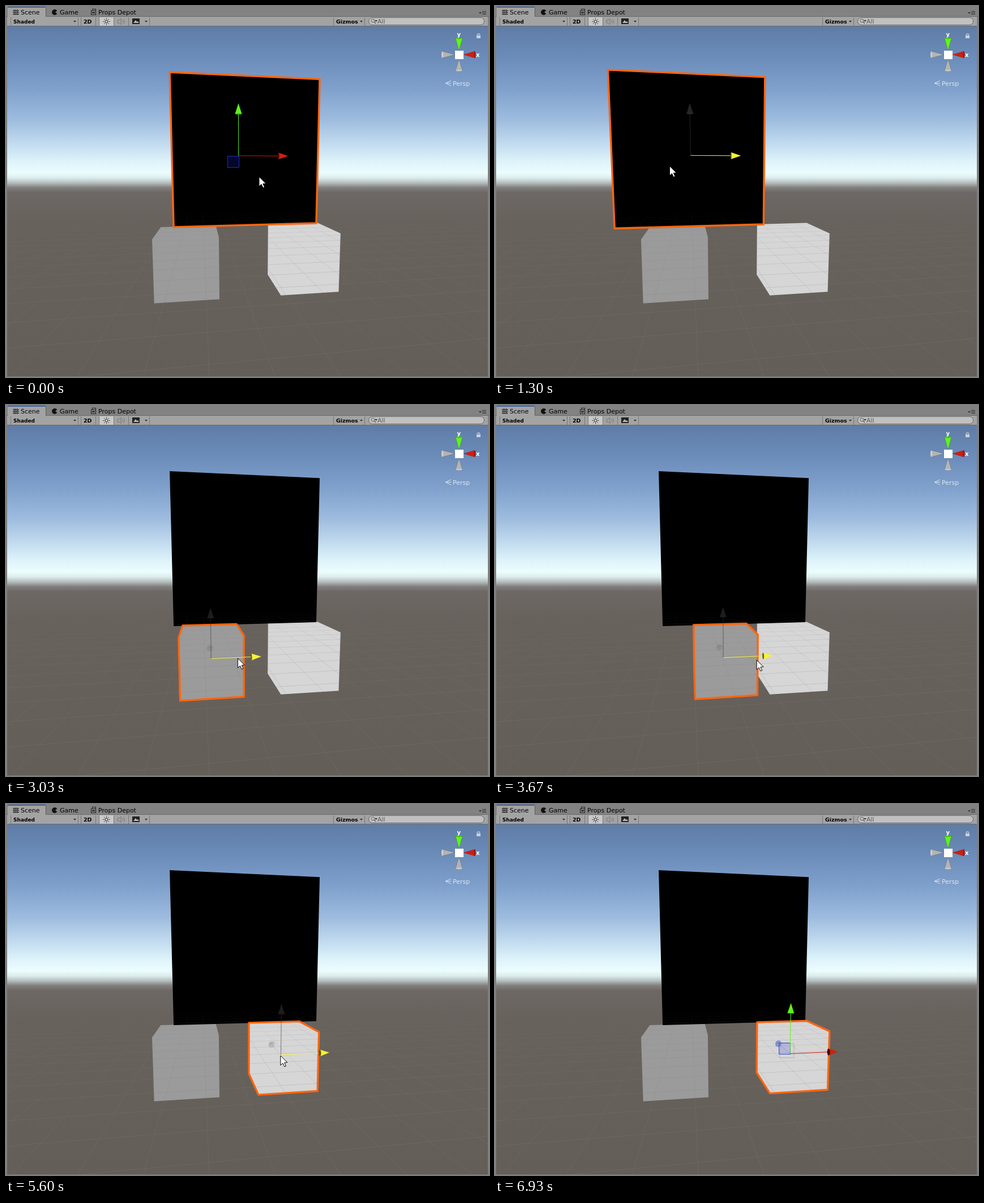
These frames come from a looping animation (853x656 px, 7460 ms). An HTML page with a canvas:

```html
<!DOCTYPE html>
<html lang="en">
<head>
<meta charset="utf-8">
<title>Scene view</title>
<style>
html, body { margin: 0; width: 100%; height: 100%; overflow: hidden; background: #828282; }
canvas { display: block; }
</style>
</head>
<body>
<canvas id="stage" width="853" height="656"></canvas>
<script>
const stage = document.getElementById('stage');
const W = 853, H = 656, LOOP = 7460, FOCAL = 537, CX = 426.5, CY = 346;
const FONT = '"DejaVu Sans", sans-serif';

// World axes expressed in camera space.
const X = [0.9888, 0.0155, 0.1484];
const Y = [0, 0.9946, -0.1037];
const Z = [-0.1492, 0.1026, 0.9835];

const add = (p, axis, k) => p.map((v, i) => v + axis[i] * k);
const dot = (a, b) => a.reduce((sum, v, i) => sum + v * b[i], 0);
const project = p => [CX + FOCAL * p[0] / p[2], CY - FOCAL * p[1] / p[2]];

// Each track lists [ms, offset along X]; past its end the move is undone.
const wall = {
  center: [-0.178, 0.919, 6.07], size: 2.38, color: '#000', grab: 35, drag: [70, 1740],
  track: [[70, 0], [380, 3.1], [800, -2.4], [1125, 3.1], [1405, -2.4], [1690, 3.1], [1860, 3.1]]
};
const grayBox = {
  center: [-1.0131, -1.0064, 5.183], size: 1, color: '#9b9b9b', grab: 72, drag: [2430, 4150],
  track: [[2430, 0], [2640, -2.04], [2950, 0.69], [3290, -1.55], [3620, 0.88], [4000, -1.13], [4150, 0]]
};
const whiteBox = {
  center: [0.9645, -0.9754, 5.48], size: 1, color: '#d6d6d6', grab: 60, drag: [4800, 6480],
  track: [[4800, 0], [5090, 2.44], [5310, -1.65], [5485, 1.5], [5685, -1.5], [5930, 2.38],
          [6200, -1.4], [6430, 2.1], [6560, 2.1]]
};
const boxes = [whiteBox, grayBox, wall];

const pointerPath = [
  [0, 447, 302], [70, 446, 268], [1300, 304, 283], [1740, 699, 285], [1970, 359, 417],
  [2130, 350, 440], [2300, 393, 445], [2430, 393, 445], [3670, 465, 451], [4150, 393, 452],
  [4480, 510, 425], [4670, 581, 439], [4800, 581, 439], [5100, 765, 412], [5600, 501, 445],
  [6480, 768, 432], [6740, 160, 160], [6920, 320, 640]
];

function ease(keys, t, col = 1) {
  if (t <= keys[0][0]) return keys[0][col];
  for (let i = 1; i < keys.length; i++) {
    const a = keys[i - 1], b = keys[i];
    if (t < b[0]) {
      const k = (1 - Math.cos(Math.PI * (t - a[0]) / (b[0] - a[0]))) / 2;
      return a[col] + (b[col] - a[col]) * k;
    }
  }
  return keys[keys.length - 1][col];
}

function centerAt(box, t) {
  const end = box.track[box.track.length - 1][0];
  return add(box.center, X, t >= end ? 0 : ease(box.track, t));
}

const isDragged = (box, t) => t >= box.drag[0] && t < box.drag[1];
const selectedAt = t => t < 2130 ? wall : t < 4490 ? grayBox : whiteBox;

function path(c, points, closed = true) {
  c.beginPath();
  points.forEach(p => c.lineTo(p[0], p[1]));
  if (closed) c.closePath();
}

function shape(c, points, fill, stroke, width = 1) {
  path(c, points);
  if (fill) { c.fillStyle = fill; c.fill(); }
  if (stroke) { c.strokeStyle = stroke; c.lineWidth = width; c.stroke(); }
}

function line(c, points, color, width = 1) {
  path(c, points, false);
  c.strokeStyle = color;
  c.lineWidth = width;
  c.stroke();
}

function rect(c, color, x, y, w, h) {
  c.fillStyle = color;
  c.fillRect(x, y, w, h);
}

function label(c, text, x, y, size = 11, color = '#000', weight = '') {
  c.font = `${weight} ${size}px ${FONT}`;
  c.fillStyle = color;
  c.fillText(text, x, y);
}

function hull(points) {
  const sorted = [...points].sort((a, b) => a[0] - b[0] || a[1] - b[1]);
  const half = list => {
    const out = [];
    for (const p of list) {
      while (out.length > 1) {
        const [a, b] = out.slice(-2);
        if ((b[0] - a[0]) * (p[1] - a[1]) - (b[1] - a[1]) * (p[0] - a[0]) > 0) break;
        out.pop();
      }
      out.push(p);
    }
    return out.slice(0, -1);
  };
  return [...half(sorted), ...half(sorted.reverse())];
}

function silhouette(center, size) {
  const corners = [];
  const h = size / 2;
  for (const a of [-h, h]) for (const b of [-h, h]) for (const d of [-h, h])
    corners.push(project(add(add(add(center, X, a), Y, b), Z, d)));
  return hull(corners);
}

function layer(paint) {
  const canvas = document.createElement('canvas');
  canvas.width = W;
  canvas.height = H;
  paint(canvas.getContext('2d'));
  return canvas;
}

const sky = layer(c => {
  const g = c.createLinearGradient(0, 36, 0, 656);
  [[36, '#5f7ca6'], [90, '#6b8cb9'], [150, '#81a2cd'], [200, '#9dbbde'], [245, '#c3dcef'],
   [275, '#def3fa'], [295, '#ecfdfd'], [304, '#dcecec'], [313, '#b2bcbc'], [321, '#827f7e'],
   [330, '#6d6865'], [380, '#68625d'], [656, '#645e58']]
    .forEach(([y, color]) => g.addColorStop((y - 36) / 620, color));
  rect(c, g, 2, 36, 849, 619);
});

const grid = layer(c => {
  const depth = 3.16;
  const ground = (x, z) => project(add(add(add([0, 0, 0], Y, -depth), X, x), Z, z));
  const fade = z => 0.34 * Math.max(0, 1 - z / 23);
  c.beginPath();
  c.rect(2, 36, 849, 619);
  c.clip();
  for (let z = 3.7; z < 23; z++)
    line(c, [ground(-25, z), ground(25, z)], `rgba(128,128,128,${fade(z)})`);
  for (let x = -21.93; x < 23; x++)
    for (let z = 3.7; z < 23; z++)
      line(c, [ground(x, z), ground(x, z + 1)], `rgba(128,128,128,${fade(Math.hypot(x, z))})`);
});

const chevron = (c, x, y) => shape(c, [[x, y], [x + 5, y], [x + 2.5, y + 3]], '#333');

function paintToolbar(c) {
  rect(c, '#828282', 0, 0, W, 36);
  rect(c, '#a3a3a3', 2, 19, 849, 17);
  rect(c, '#696969', 0, 18, W, 1);
  rect(c, '#6a6a6a', 2, 35, 849, 1);
  rect(c, '#a3a3a3', 3, 2, 67, 17);
  rect(c, '#42649d', 3, 1, 67, 2);
  rect(c, '#5c5c5c', 70, 3, 1, 15);

  for (let i = 0; i < 3; i++) {
    rect(c, '#222', 14 + i * 3, 6, 1, 10);
    rect(c, '#222', 12, 8 + i * 3, 11, 1);
  }
  label(c, 'Scene', 26, 15);
  c.fillStyle = '#111';
  c.beginPath();
  c.moveTo(87, 11);
  c.arc(86, 11, 5, 0.55, 5.73);
  c.fill();
  label(c, 'Game', 95, 15);
  c.strokeStyle = '#222';
  c.lineWidth = 1;
  c.strokeRect(150.5, 8.5, 8, 7);
  c.strokeRect(152.5, 5.5, 6, 3);
  rect(c, '#222', 152, 11, 5, 2);
  label(c, 'Props Depot', 163, 15);
  chevron(c, 835, 11);
  for (let i = 0; i < 3; i++) rect(c, '#333', 841, 9 + i * 2.5, 7, 1);

  for (const x of [8, 127, 132, 158, 164, 190, 216, 253, 578, 633]) rect(c, '#777', x, 20, 1, 15);
  rect(c, '#c8c8c8', 165, 20, 25, 15);
  label(c, 'Shaded', 13, 31, 9, '#000', 'bold');
  chevron(c, 119, 26);
  label(c, '2D', 137, 31, 9.5, '#000', 'bold');
  for (let i = 0; i < 8; i++) {
    const a = i * Math.PI / 4, u = Math.cos(a), v = Math.sin(a);
    line(c, [[177.5 + u * 4, 27.5 + v * 4], [177.5 + u * 6, 27.5 + v * 6]], '#222');
  }
  c.beginPath();
  c.arc(177.5, 27.5, 2.4, 0, 7);
  c.stroke();
  shape(c, [[197, 25], [200, 25], [203, 22], [203, 33], [200, 30], [197, 30]], null, '#777');
  for (const r of [3, 6]) {
    c.beginPath();
    c.arc(203.5, 27.5, r, -0.9, 0.9);
    c.stroke();
  }
  rect(c, '#222', 223, 22, 13, 10);
  shape(c, [[225, 30], [229, 25], [231, 28], [233, 27], [235, 30]], '#bbb');
  chevron(c, 245, 26);
  label(c, 'Gizmos', 583, 31, 9.5, '#000', 'bold');
  chevron(c, 625, 26);

  c.beginPath();
  c.roundRect(640.5, 20.5, 204, 13, 6.5);
  c.fillStyle = '#c0c0c0';
  c.fill();
  c.strokeStyle = '#666';
  c.stroke();
  c.beginPath();
  c.arc(648, 26, 3, 0, 7);
  c.stroke();
  line(c, [[650, 28], [653, 31]], '#555', 1.3);
  chevron(c, 651, 25);
  label(c, 'All', 656, 31, 11, '#5c5c5c');
}

function paintCompass(c) {
  const gray = '#b4b4b4';
  const flatCone = (tip, a, b, fill) => shape(c, [tip, a, b], fill, 'rgba(50,50,50,.35)', 0.7);
  flatCone([800, 79], [794, 57], [806, 57], '#5ef51c');
  flatCone([808, 86], [828, 80], [828, 92], '#d41c10');
  flatCone([793, 86], [770, 80], [770, 92], gray);
  flatCone([800, 94], [794, 114], [806, 114], gray);
  const cap = (x, y, rx, ry, color) => {
    c.beginPath();
    c.ellipse(x, y, rx, ry, 0, 0, 7);
    c.fillStyle = color;
    c.fill();
  };
  cap(800, 57, 6, 1.5, '#45c014');
  cap(828, 86, 1.5, 6, '#a1150c');
  cap(770.5, 86, 1.5, 6, '#d0d0d0');
  cap(800, 114, 6, 1.5, '#c8c8c8');
  rect(c, '#fff', 793, 79, 15, 15);
  label(c, 'y', 796.5, 54, 10, '#fff', 'bold');
  label(c, 'x', 830, 90, 10, '#fff', 'bold');
  rect(c, '#c9d1dc', 831, 52, 7, 5);
  c.beginPath();
  c.arc(834.5, 51.5, 2.3, Math.PI, 0);
  c.strokeStyle = '#c9d1dc';
  c.lineWidth = 1.3;
  c.stroke();
  for (const y of [132, 136.5, 141]) line(c, [[776, 136.5], [786, y]], '#d9e3ee');
  label(c, 'Persp', 789, 141, 11, '#dce6f0');
}

const overlay = layer(c => {
  paintToolbar(c);
  paintCompass(c);
  rect(c, '#808080', 0, 36, 2, 620);
  rect(c, '#808080', 851, 36, 2, 620);
  rect(c, '#808080', 0, 655, W, 1);
});

function arrow(c, origin, axis, color, capColor) {
  const reach = origin[2] * 0.168;
  const from = project(origin);
  const neckPoint = add(origin, axis, reach * 0.8);
  const neck = project(neckPoint), tip = project(add(origin, axis, reach));
  const angle = Math.atan2(tip[1] - from[1], tip[0] - from[0]);
  const nx = -Math.sin(angle) * 6, ny = Math.cos(angle) * 6;
  const facing = dot(axis, neckPoint) / Math.hypot(...neckPoint);
  line(c, [from, neck], color);
  shape(c, [tip, [neck[0] + nx, neck[1] + ny], [neck[0] - nx, neck[1] - ny]], color);
  if (facing < 0.03) return;
  c.beginPath();
  c.ellipse(neck[0], neck[1], 6 * facing, 6, angle, 0, 7);
  c.fillStyle = capColor;
  c.fill();
}

function paintGizmo(c, box, center, dragging) {
  const [x, y] = project(center);
  const far = project(add(center, Z, center[2] * 0.168));
  const dim = 'rgba(50,50,50,.58)', faint = 'rgba(110,110,110,.22)';
  if (Math.hypot(far[0] - x, far[1] - y) > 15)
    arrow(c, center, Z, dragging ? faint : 'rgba(90,110,205,.3)', dragging ? faint : 'rgba(80,105,200,.5)');
  if (!dragging) {
    const onWall = box === wall;
    const sx = box === grayBox ? 20 : -20, sy = onWall ? 20 : -20;
    c.fillStyle = 'rgba(30,40,230,.18)';
    c.strokeStyle = onWall ? '#2030c0' : '#3858d0';
    c.lineWidth = 1;
    c.beginPath();
    c.rect(Math.round(x) + 0.5, Math.round(y) + 0.5, sx, sy);
    c.fill();
    c.stroke();
    if (!onWall) {
      c.strokeStyle = 'rgba(190,100,90,.4)';
      c.strokeRect(x - 18, y - 18, 25, 25);
    }
  }
  const quiet = box === wall ? 'rgba(55,55,55,.65)' : dim;
  arrow(c, center, Y, dragging ? quiet : '#5cf31a', dragging ? quiet : '#45b814');
  arrow(c, center, X, dragging ? '#f6f03a' : '#d21e0f', dragging ? '#5d5715' : '#3a0b06');
}

function paintPointer(c, t) {
  if (t >= 6920) return;
  const held = boxes.find(box => isDragged(box, t));
  const x = held ? project(centerAt(held, t + 30))[0] + held.grab : ease(pointerPath, t, 1);
  const y = ease(pointerPath, t, 2);
  const outline = [[0, 0], [0, 17], [4, 13.3], [7, 19.5], [9.6, 18.3], [6.8, 12.3], [12, 12]];
  shape(c, outline.map(p => [x + p[0], y + p[1]]), '#fff', '#000', 1);
}

function paint(c, t) {
  const selected = selectedAt(t);
  c.clearRect(0, 0, W, H);
  c.drawImage(sky, 0, 0);
  c.save();
  c.beginPath();
  c.rect(2, 36, 849, 619);
  c.clip();
  c.lineJoin = 'round';
  const solids = [whiteBox, grayBox].sort((a, b) => (a === selected) - (b === selected));
  for (const box of [...solids, wall])
    shape(c, silhouette(centerAt(box, t), box.size), box.color);
  c.drawImage(grid, 0, 0);
  const center = centerAt(selected, t);
  shape(c, silhouette(center, selected.size), null, '#ff6610', 3.4);
  paintGizmo(c, selected, center, isDragged(selected, t));
  c.restore();
  c.drawImage(overlay, 0, 0);
  paintPointer(c, t);
}

const ctx = stage.getContext('2d');
const start = performance.now();
function tick() {
  paint(ctx, (performance.now() - start) % LOOP);
  requestAnimationFrame(tick);
}
tick();
</script>
</body>
</html>
```
